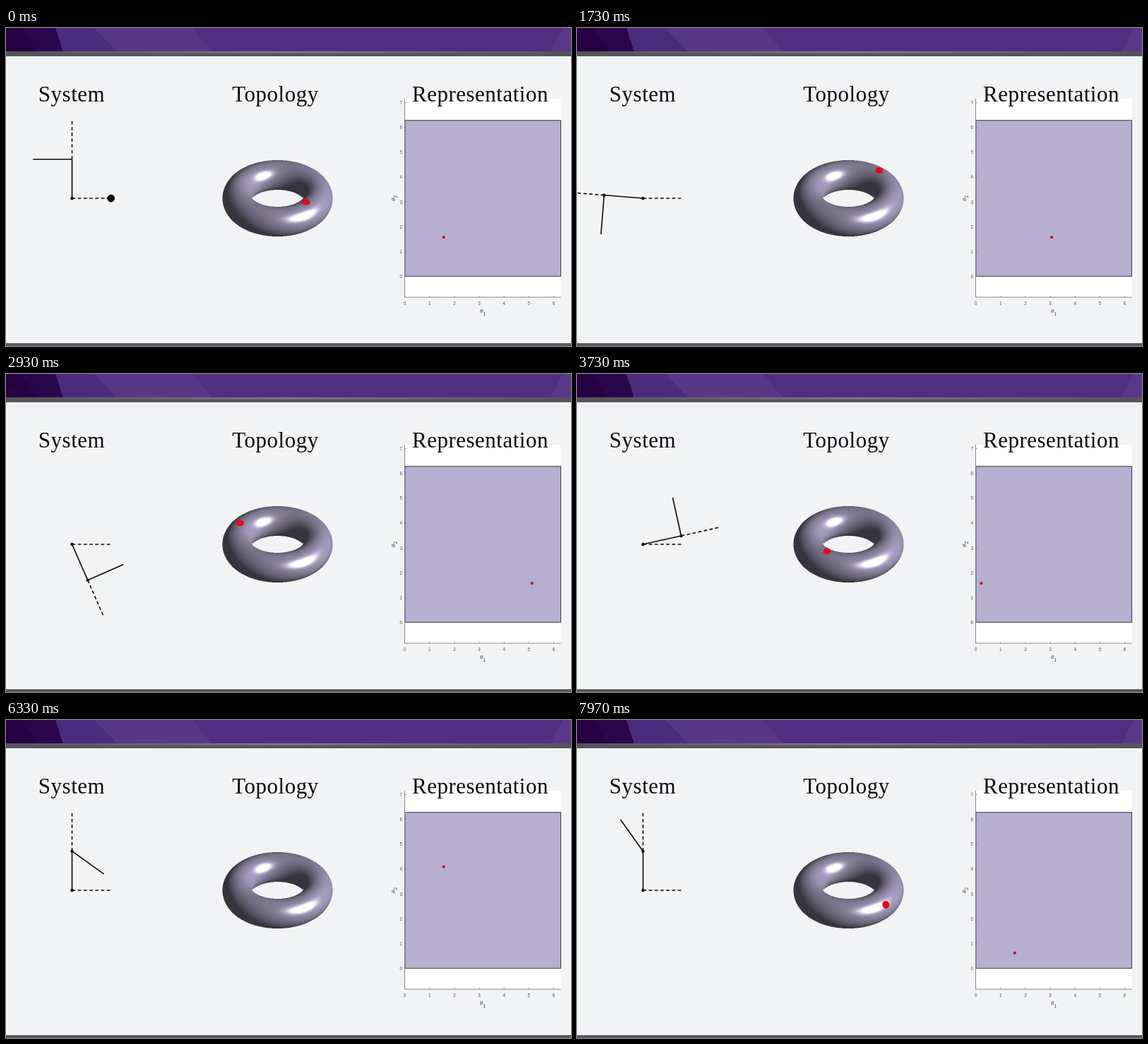
An HTML page with a canvas that plays this animation: 800x450 px, repeating every 8 s.

```html
<!DOCTYPE html>
<html lang="en">
<head>
<meta charset="utf-8">
<title>Two-link arm, torus and angle chart</title>
<style>
  html, body { margin: 0; width: 100%; height: 100%; overflow: hidden; background: #f2f3f5; }
  svg, canvas { position: absolute; display: block; }
  svg { left: 0; top: 0; }
  canvas { left: 304px; top: 184px; width: 161px; height: 114px; }
  .head { font: 31px "Liberation Serif", serif; letter-spacing: .5px; text-anchor: middle; fill: #0c0c0e; }
  .tick { font: 6.4px "Liberation Sans", sans-serif; fill: #505050; }
  .axis { font: italic 8px "Liberation Sans", sans-serif; fill: #444; text-anchor: middle; }
  .axis tspan { font-size: 6.4px; font-style: normal; }
  .link { stroke: #0a0a0a; stroke-width: 1.6; }
  .dash { stroke-dasharray: 4.8 3.4; }
</style>
</head>
<body>
<svg width="800" height="450" viewBox="0 0 800 450">
  <defs>
    <linearGradient id="sheen">
      <stop offset="0" stop-color="#55535a"/>
      <stop offset=".5" stop-color="#8d8a92"/>
      <stop offset="1" stop-color="#55535a"/>
    </linearGradient>
    <linearGradient id="shade" x2="0" y2="1">
      <stop offset="0" stop-color="#55535a" stop-opacity="0"/>
      <stop offset=".6" stop-color="#55535a"/>
    </linearGradient>
  </defs>
  <rect width="800" height="450" fill="#f2f3f5"/>
  <rect width="800" height="34" fill="#522d80"/>
  <path d="M70 0H125L158 34H81Z" fill="#4d2b7c"/>
  <path d="M125 0H264L292 34H158Z" fill="#593686"/>
  <path d="M0 0H70L81 34H0Z" fill="#2b0549"/>
  <path d="M0 0H22L45 34H0Z" fill="#260042"/>
  <path d="M788 0H800V34H771Z" fill="#5a3887"/>
  <rect y="33" width="800" height="7" fill="url(#sheen)"/>
  <rect y="33" width="800" height="7" fill="url(#shade)"/>
  <rect y="446" width="800" height="4" fill="#5a585f"/>

  <rect x="564.5" y="100" width="221" height="281" fill="#fff"/>
  <rect x="564.8" y="130.7" width="220.7" height="220.6" fill="#b7afd2" stroke="#3c3947"/>
  <path d="M564.5 100V381H785.5" fill="none" stroke="#777" stroke-width=".9"/>
  <g id="ticks"></g>
  <text class="axis" x="675" y="403">θ<tspan dy="3.5">1</tspan></text>
  <text class="axis" transform="translate(551 241) rotate(-90)">θ<tspan dy="3">2</tspan></text>

  <text class="head" x="93" y="104">System</text>
  <text class="head" x="381.5" y="104">Topology</text>
  <text class="head" x="671.5" y="104">Representation</text>

  <g id="arm" fill="#0a0a0a">
    <path class="link dash" d="M93.5 241H149"/>
    <line id="ext" class="link dash"/>
    <line id="upper" class="link"/>
    <line id="fore" class="link"/>
    <circle cx="93.5" cy="241" r="2.2"/>
    <circle id="joint"/>
  </g>
  <circle id="dot" r="2.1" fill="#e3061c"/>
  <circle id="hidden" r="5.5" fill="#e6081c"/>
</svg>
<canvas id="torus" width="322" height="228"></canvas>
<svg width="800" height="450" viewBox="0 0 800 450">
  <path id="ball" fill="#e6081c"/>
</svg>
<script>
const $ = id => document.getElementById(id);
const { PI, sin, cos, sqrt, hypot, max, min } = Math;
const RAD = PI / 180;

// Plot scale
const UNIT = 35.13, plotX = v => 564.7 + UNIT * v, plotY = v => 351.4 - UNIT * v;

// Torus: ring and tube radius, camera elevation
const RING = 57, TUBE = 21, SE = .579, CE = .815;
const CX = 384.5, CY = 241;

function set(el, attrs) {
  for (const k in attrs) el.setAttribute(k, attrs[k]);
}

function add(parent, tag, attrs, text) {
  const el = document.createElementNS(parent.namespaceURI, tag);
  set(el, attrs);
  if (text !== undefined) el.textContent = text;
  parent.appendChild(el);
}

function drawTicks() {
  const g = $("ticks"), stroke = { stroke: "#777", "stroke-width": .8, fill: "none" };
  for (let i = 0; i < 8; i++) {
    const y = plotY(i), x = plotX(i);
    add(g, "path", { d: `M564.5 ${y}h2.2`, ...stroke });
    add(g, "text", { class: "tick", x: 561, y: y + 2.5, "text-anchor": "end" }, i);
    if (i > 6) continue;
    add(g, "path", { d: `M${x} 381v-2.2`, ...stroke });
    add(g, "text", { class: "tick", x, y: 391.5, "text-anchor": "middle" }, i);
  }
}

// Axes: x right, y towards the viewer, z up
function shade(sx, sy) {
  let y = 100 * CE + sy * SE, z = 100 * SE - sy * CE;
  for (let i = 0; i < 90; i++) {
    const rho = hypot(sx, y), out = rho - RING, dist = hypot(out, z) - TUBE;
    if (dist < .02) {
      const k = out / (TUBE * rho);
      return light(sx * k, y * k, z / TUBE);
    }
    y -= dist * CE;
    z -= dist * SE;
    if (z < -90) break;
  }
  return null;
}

// Phong shading with one distant light
function light(nx, ny, nz) {
  const L = [.7, .4, .6];
  const nl = nx * L[0] + ny * L[1] + nz * L[2];
  const nv = ny * CE + nz * SE;
  const rv = 2 * nl * nv - (L[1] * CE + L[2] * SE);
  const body = .3 + .6 * max(0, nl);
  const spec = nl > 0 ? .9 * max(0, rv) ** 10 : 0;
  return [.715, .68, .82].map(c => 255 * min(1, c * body + spec));
}

function drawTorus() {
  const cv = $("torus"), ctx = cv.getContext("2d");
  const img = ctx.createImageData(cv.width, cv.height);
  for (let j = 0, p = 0; j < cv.height; j++) {
    for (let i = 0; i < cv.width; i++, p += 4) {
      const c = shade((i + .5 - cv.width / 2) / 2, (j + .5 - cv.height / 2) / 2);
      if (c) img.data.set([...c, 255], p);
    }
  }
  ctx.putImageData(img, 0, 0);
}

function line(id, a, b) {
  set($(id), { x1: a[0], y1: a[1], x2: b[0], y2: b[1] });
}

function drawArm(a, b, moving) {
  const reach = (p, ang) => [p[0] + 55.3 * cos(ang), p[1] - 55.3 * sin(ang)];
  const base = [93.5, 241], elbow = reach(base, a);
  line("upper", base, elbow);
  line("ext", elbow, reach(elbow, a));
  line("fore", elbow, reach(elbow, a + b));
  const [cx, cy] = moving ? elbow : [148.7, 241];
  set($("joint"), { cx, cy, r: moving ? 2.2 : 5.4 });
}

function drawMarker(a, b) {
  const turn = .75 * PI - a, rho = RING + TUBE * cos(b);
  const x = CX + rho * cos(turn);
  const y = CY + rho * sin(turn) * SE - TUBE * sin(b) * CE;
  const nx = cos(b) * cos(turn), ny = cos(b) * sin(turn), nz = sin(b);
  const facing = ny * CE + nz * SE;
  const tilt = Math.atan2(ny * SE - nz * CE, nx) / RAD;
  const front = facing >= 0, s = 5.5;
  $("hidden").style.display = front ? "none" : "";
  $("ball").style.display = front ? "" : "none";
  set($("hidden"), { cx: x, cy: y });
  // Visible part of a ball half sunk into the surface
  set($("ball"), {
    d: `M0 ${-s}A${s} ${s} 0 0 1 0 ${s}A${max(.01, s * facing)} ${s} 0 0 1 0 ${-s}Z`,
    transform: `translate(${x} ${y}) rotate(${tilt})`
  });
}

const STEPS = 240, TURN = 3.285;
const sweep = (n, start) => (90 + min(360, max(0, n - start) * TURN)) * RAD;

function render(ms) {
  const n = Math.floor((ms % 8000 + 5) * .03) % STEPS;
  const a = sweep(n, 26), b = sweep(n, 146);
  drawArm(a, b, n > 26);
  drawMarker(a, b);
  set($("dot"), { cx: plotX(a % (2 * PI)), cy: plotY(b % (2 * PI)) });
}

drawTicks();
drawTorus();
const t0 = performance.now();
function tick(now) {
  render(max(0, now - t0));
  requestAnimationFrame(tick);
}
render(0);
requestAnimationFrame(tick);
</script>
</body>
</html>
```
